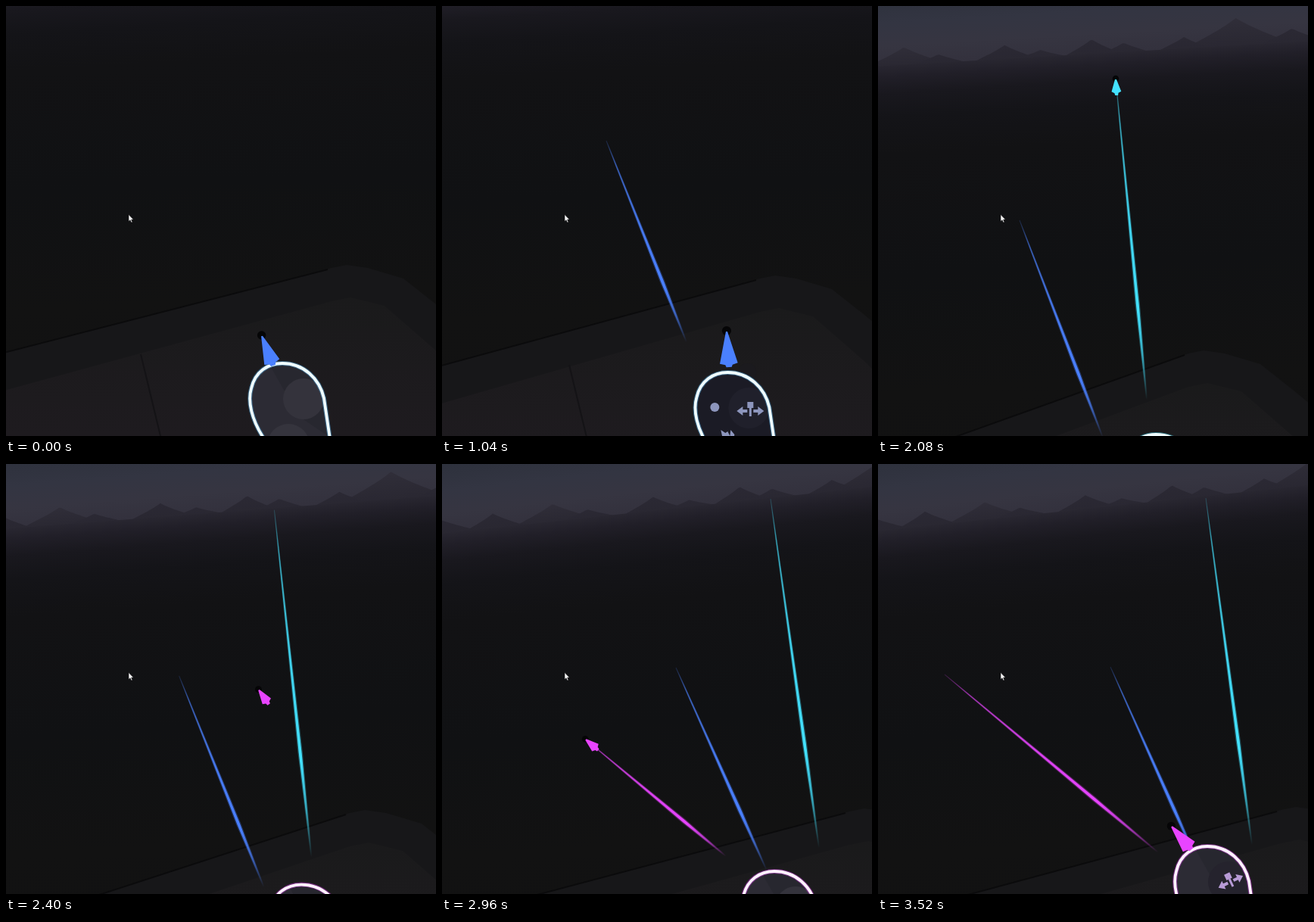
These frames come from a looping animation (568x568 px, 3600 ms). An HTML page with a canvas:

```html
<!DOCTYPE html>
<html lang="en">
<head>
<meta charset="utf-8">
<title>Light strokes</title>
<style>
  html, body { margin: 0; width: 100%; height: 100%; overflow: hidden; background: #111214; }
  canvas { display: block; width: 100%; height: 100%; }
</style>
</head>
<body>
<canvas id="stage" width="568" height="568"></canvas>
<script>
const ctx = document.getElementById('stage').getContext('2d');
const SIZE = 568, LOOP = 3600, STEP = 80;
const BLUE = '74,128,255', CYAN = '68,226,255', PINK = '232,68,255';

// Camera poses are numbered; this maps time to a fractional pose.
const poseTime = [[0, 0], [1040, 1], [1200, 1], [1520, 2], [2080, 3], [2240, 3],
  [2640, 4], [2960, 5], [3520, 6]];

// One entry per camera pose.
const horizon = [[323, -50, -.058], [313, -37, -.058], [275, 38, -.058], [283, 62, -.058],
  [375, 57, -.105], [395, 48, -.108], [390, 46, -.106]];
const corner = [[450, 342, .256], [440, 356, .27], [415, 425, .34], [430, 455, .35],
  [540, 460, .277], [558, 455, .264], [552, 453, .268]];
const blueLine = [[227, 164, 335, 432], [217, 178, 323, 444], [178, 257, 288, 544],
  [187, 283, 297, 570], [291, 275, 406, 542], [309, 269, 429, 537], [307, 268, 426, 534]];
const cyanLine = [[340, -60, 380, 390], [340, -50, 375, 400], [310, 40, 345, 490],
  [314, 66, 355, 520], [415, 53, 476, 518], [434, 46, 498, 507], [433, 45, 494, 503]];
const pinkLine = [[72, 290, 352, 534], [72, 290, 352, 534], [72, 290, 352, 534],
  [72, 290, 352, 534], [74, 290, 358, 532], [92, 281, 375, 518], [88, 278, 370, 513]];

// Time, tip, base of the cone.
const coneTrack = [
  [0, 338, 436, 352, 472], [80, 334, 428, 347, 462], [560, 238, 230, 247, 254],
  [720, 220, 183, 227, 200], [960, 372, 431, 376, 475], [1040, 376, 430, 379, 474],
  [1200, 374, 414, 377, 456], [1280, 367, 423, 370, 463], [1520, 325, 286, 328, 315],
  [2080, 314, 97, 315, 115], [2240, 314, 68, 315, 84], [2560, 354, 529, 376, 546],
  [2640, 293, 478, 317, 498], [2960, 190, 364, 204, 376], [3200, 92, 281, 103, 290],
  [3440, 375, 474, 400, 505], [3520, 388, 479, 412, 507]];
// Time and top of the controller ring.
const padTrack = [[0, 365, 472], [640, 352, 508], [960, 377, 484], [1200, 378, 484],
  [1520, 356, 537], [2080, 367, 566], [2240, 367, 566], [2640, 425, 540],
  [2960, 439, 538], [3200, 436, 540], [3520, 435, 505]];
// Position, height, half width of each hill, back ones first.
const hills = [[475, 35, 72], [35, 22, 55], [-45, 18, 42], [80, 10, 38], [168, 17, 42],
  [215, 8, 36], [283, 18, 38], [325, 11, 34], [405, 14, 36], [452, 8, 30], [548, 17, 46],
  [-120, 20, 55], [640, 24, 60]];

const mix = (a, b, k) => a.map((v, i) => v + (b[i] - v) * k);

function track(rows, t) {
  let i = 0;
  while (i < rows.length - 2 && t >= rows[i + 1][0]) i++;
  const a = rows[i], b = rows[i + 1];
  const k = Math.min(1, Math.max(0, (t - a[0]) / (b[0] - a[0])));
  return mix(a, b, k).slice(1);
}

function pose(list, p) {
  const i = Math.min(Math.floor(p), list.length - 2);
  return mix(list[i], list[i + 1], p - i);
}

function gradient(x0, y0, x1, y1, stops) {
  const g = ctx.createLinearGradient(x0, y0, x1, y1);
  stops.forEach(([at, color]) => g.addColorStop(at, color));
  return g;
}

function poly(points, fill) {
  ctx.beginPath();
  points.forEach(([x, y]) => ctx.lineTo(x, y));
  ctx.closePath();
  ctx.fillStyle = fill;
  ctx.fill();
}

function disc(x, y, r, fill) {
  ctx.beginPath();
  ctx.arc(x, y, r, 0, 7);
  ctx.fillStyle = fill;
  ctx.fill();
}

function drawLand([x, y, angle]) {
  ctx.save();
  ctx.translate(x, y);
  ctx.rotate(angle);
  ctx.translate(-283, 0);
  ctx.fillStyle = gradient(0, -100, 0, 0,
    [[0, '#2c303b'], [.45, '#333542'], [.75, '#363541'], [1, '#33313d']]);
  ctx.fillRect(-500, -300, 1700, 305);
  hills.forEach(([hx, h, w], i) => {
    ctx.beginPath();
    for (let s = -w; s <= w; s += 3) {
      const q = Math.abs(s) / w;
      ctx.lineTo(hx + s, 3 - (h + 3) * (1 - q) * (1 - q * .3 + q * q * .3));
    }
    ctx.fillStyle = gradient(0, -h, 0, 5, [[0, i < 2 ? '#302e39' : '#2b2934'], [1, '#292731']]);
    ctx.fill();
  });
  ctx.fillStyle = gradient(0, 0, 0, 620,
    [[0, '#292731'], [.025, '#211f28'], [.06, '#19181e'], [.11, '#141418'],
     [.19, '#121214'], [.45, '#101113'], [.7, '#121212'], [1, '#111112']]);
  ctx.fillRect(-500, 1, 1700, 1200);
  ctx.restore();
}

function drawDeck([x, y, slope]) {
  const left = y + x * slope;
  poly([[0, left], [x - 20, y + 4], [x, y], [x + 28, y + 4], [x + 75, y + 18],
    [x + 118, y + 52], [x + 200, y + 120], [700, 700], [0, 700]], '#171719');
  const ix = x + 5, iy = y + 43;
  poly([[0, left + 50], [ix - 25, iy + 5], [ix, iy], [ix + 45, iy + 11], [ix + 115, iy + 72],
    [ix + 230, iy + 190], [0, 700]], gradient(0, iy, 0, iy + 180, [[0, '#1a1a1b'], [1, '#1e1b1f']]));
  ctx.beginPath();
  ctx.moveTo(0, left);
  ctx.lineTo(x - 25, y + 6);
  ctx.strokeStyle = '#0b0b0c';
  ctx.lineWidth = 2;
  ctx.stroke();
  ctx.beginPath();
  ctx.moveTo(x - 272, y + 118);
  ctx.lineTo(x - 245, y + 230);
  ctx.strokeStyle = '#141316';
  ctx.stroke();
}

// Tapered ribbon, fading at both ends.
function drawStroke([ax, ay, bx, by], rgb) {
  const dx = bx - ax, dy = by - ay, len = Math.hypot(dx, dy);
  if (len < 2) return;
  const nx = -dy / len, ny = dx / len;
  const side = (k, w) => [ax + dx * k + nx * w, ay + dy * k + ny * w];
  const w = Math.min(1.9, .9 + len / 250);
  const fill = alpha => gradient(ax, ay, bx, by,
    [[0, `rgba(${rgb},${.15 * alpha})`], [.12, `rgba(${rgb},${.6 * alpha})`],
     [.45, `rgba(${rgb},${.9 * alpha})`], [.72, `rgba(${rgb},${alpha})`],
     [.86, `rgba(${rgb},${.65 * alpha})`], [1, `rgba(${rgb},0)`]]);
  [[1.7, .3], [1, 1]].forEach(([s, alpha]) => poly([
    side(0, .4 * s), side(.7, w * s), side(1, .7 * s),
    side(1, -.7 * s), side(.7, -w * s), side(0, -.4 * s)], fill(alpha)));
}

function drawCone([tx, ty, bx, by], rgb) {
  const dx = bx - tx, dy = by - ty, len = Math.hypot(dx, dy);
  disc(tx - dx / len, ty - dy / len, 3 + len * .07, '#050506');
  ctx.save();
  ctx.translate(tx, ty);
  ctx.rotate(Math.atan2(dy, dx));
  const hw = 2.6 + len * .21;
  poly([[0, -1], [len - 2, -hw], [len, -hw * .4], [len + 3, -hw * .3],
    [len + 3, hw * .3], [len, hw * .4], [len - 2, hw], [0, 1]], `rgb(${rgb})`);
  ctx.restore();
}

function drawIcon(x, y, angle, color) {
  ctx.save();
  ctx.translate(x, y);
  ctx.rotate(angle);
  for (const s of [-1, 1]) {
    poly([[s * 18, 2], [s * 10, -4], [s * 10, 0], [s * 4, 0], [s * 4, 4],
      [s * 10, 4], [s * 10, 8]], color);
  }
  ctx.fillRect(-4, -10, 8, 8);
  ctx.fillRect(-1.5, -2, 3, 11);
  ctx.restore();
}

function padPath() {
  ctx.beginPath();
  ctx.moveTo(-24, 100);
  ctx.bezierCurveTo(-41, 74, -46, 50, -41, 33);
  ctx.bezierCurveTo(-36, 11, -19, 0, 0, 0);
  ctx.bezierCurveTo(28, 0, 49, 20, 55, 46);
  ctx.lineTo(63, 100);
}

function drawPad([x, y], t, rgb) {
  const icons = t >= 800 && t < 1280, late = t >= 3200;
  ctx.save();
  ctx.translate(x, y);
  if (icons) disc(26, 0, 12, '#1b1a1e');
  padPath();
  ctx.fillStyle = icons ? '#1b1b25' : '#2c2b34';
  ctx.fill();
  ctx.save();
  ctx.clip();
  if (!icons) {
    poly([[-18, 0], [60, 0], [66, 100], [22, 70]], '#27272f');
    disc(8, 108, 28, '#35343d');
  }
  disc(28, 47, 27, icons ? '#20202b' : late ? '#25232d' : '#34333c');
  if (icons) {
    const tint = '#8d96bd';
    disc(-17, 46, 6, tint);
    drawIcon(30, 49, 0, tint);
    poly([[-9, 76], [-3, 80], [0, 78], [3, 84], [4, 76], [9, 82], [8, 90], [-6, 90]], tint);
  } else if (late) {
    drawIcon(30, 45, -.45, '#b89bd6');
  }
  ctx.restore();
  padPath();
  ctx.lineJoin = 'round';
  ctx.strokeStyle = `rgba(${rgb},.4)`;
  ctx.lineWidth = 6;
  ctx.stroke();
  ctx.strokeStyle = t >= 2400 ? '#fff2ff' : '#f0fdff';
  ctx.lineWidth = 3.8;
  ctx.stroke();
  ctx.restore();
}

function drawCursor() {
  ctx.save();
  ctx.translate(162, 275.5);
  const arrow = [[0, 0], [0, 9], [2, 7.3], [3.6, 10.6], [5, 10], [3.6, 6.8], [6.3, 6.6]];
  poly(arrow, '#f2f2f2');
  ctx.strokeStyle = '#08080a';
  ctx.lineWidth = .5;
  ctx.stroke();
  ctx.restore();
}

function draw(t) {
  const p = track(poseTime, t)[0];
  const cone = track(coneTrack, t);
  const color = t < 1200 ? BLUE : t < 2400 ? CYAN : PINK;
  drawLand(pose(horizon, p));
  drawDeck(pose(corner, p));
  for (const [line, rgb, from, to] of [
    [blueLine, BLUE, 80, 720], [cyanLine, CYAN, 1280, 2240], [pinkLine, PINK, 2560, 3200]]) {
    if (t < from) continue;
    const ends = pose(line, p);
    if (t < to) ends.splice(0, 2, cone[0], cone[1]);
    drawStroke(ends, rgb);
  }
  drawPad(track(padTrack, t), t, t < 1200 ? '90,190,255' : color);
  drawCone(cone, color);
  drawCursor();
}

function tick() {
  const t = performance.now() % LOOP;
  draw(Math.floor(t / STEP) * STEP);
  requestAnimationFrame(tick);
}
tick();
</script>
</body>
</html>
```
